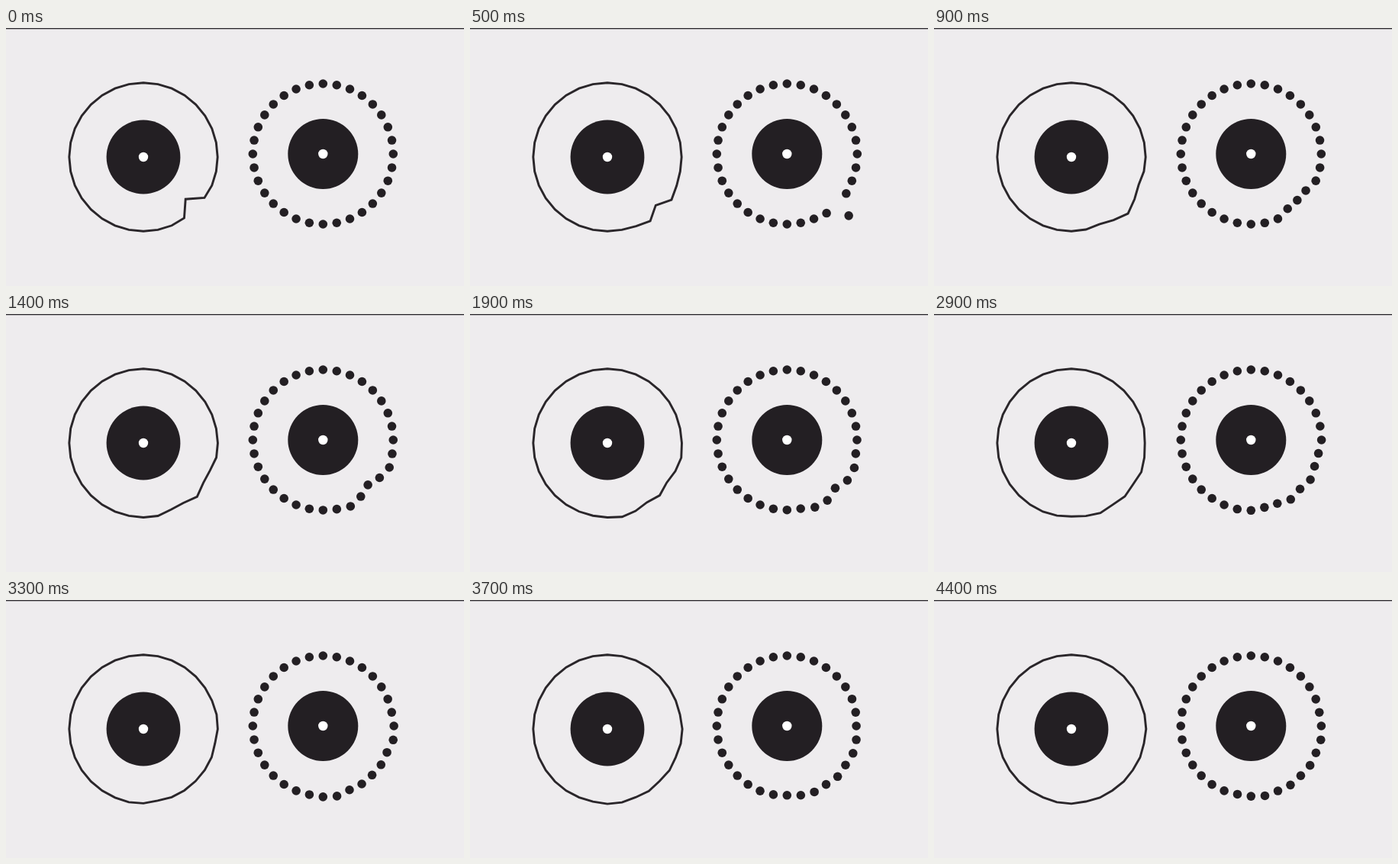
An HTML page with a canvas that plays this animation: 600 px wide and 338 px high, repeating every 4.5 s.

```html
<!DOCTYPE html>
<html lang="en">
<head>
<meta charset="utf-8">
<title>Plucked rings</title>
<style>
  html, body { margin: 0; width: 100%; height: 100%; overflow: hidden; background: #eeecee; }
  canvas { display: block; }
</style>
</head>
<body>
<canvas id="stage" width="600" height="338"></canvas>
<script>
const ctx = document.getElementById('stage').getContext('2d');
const LOOP = 4.5, N = 32, STEP = 2 * Math.PI / N, PLUCKED = 4;
const INK = '#231f23';

// Ring of damped springs, each one coupled to its two neighbours
const OMEGA = 10.91, COUPLING = 13.1, DAMPING = 0.5;
const modes = Array.from({ length: N }, (_, m) =>
  Math.sqrt(OMEGA ** 2 - 2 * COUPLING * Math.cos(m * STEP)));

// Radial offset of a point n places from the plucked one, t seconds after the pluck
function offset(n, t, size) {
  if (t <= 0) return 0;
  let sum = 0;
  modes.forEach((w, m) => sum += Math.cos(m * n * STEP) * Math.sin(w * t) / w);
  return size * OMEGA * Math.exp(-DAMPING * t) * sum / N;
}

function ring(cx, cy, radius, t, size) {
  return modes.map((_, k) => {
    const r = radius + offset(k - PLUCKED, t, size), a = k * STEP;
    return [cx + r * Math.cos(a), cy + r * Math.sin(a)];
  });
}

function disc(x, y, r, color) {
  ctx.fillStyle = color;
  ctx.beginPath();
  ctx.arc(x, y, r, 0, 2 * Math.PI);
  ctx.fill();
}

function hub(x, y, r) {
  disc(x, y, r, INK);
  disc(x, y, 6.2, '#fff');
}

function draw() {
  const t = performance.now() / 1000 % LOOP;
  ctx.fillStyle = '#eeecee';
  ctx.fillRect(0, 0, 600, 338);
  ctx.fillStyle = '#343136';
  ctx.fillRect(0, 0, 600, 1.4);

  ctx.beginPath();
  for (const p of ring(180, 169, 97.2, t + 0.14, -20.5)) ctx.lineTo(...p);
  ctx.closePath();
  ctx.strokeStyle = '#2a262a';
  ctx.lineWidth = 2.9;
  ctx.stroke();
  hub(180, 169, 48.4);

  for (const [x, y] of ring(415.3, 165, 92, t - 0.356, 24)) disc(x, y, 5.8, INK);
  hub(415.3, 165, 46);

  requestAnimationFrame(draw);
}
draw();
</script>
</body>
</html>
```
